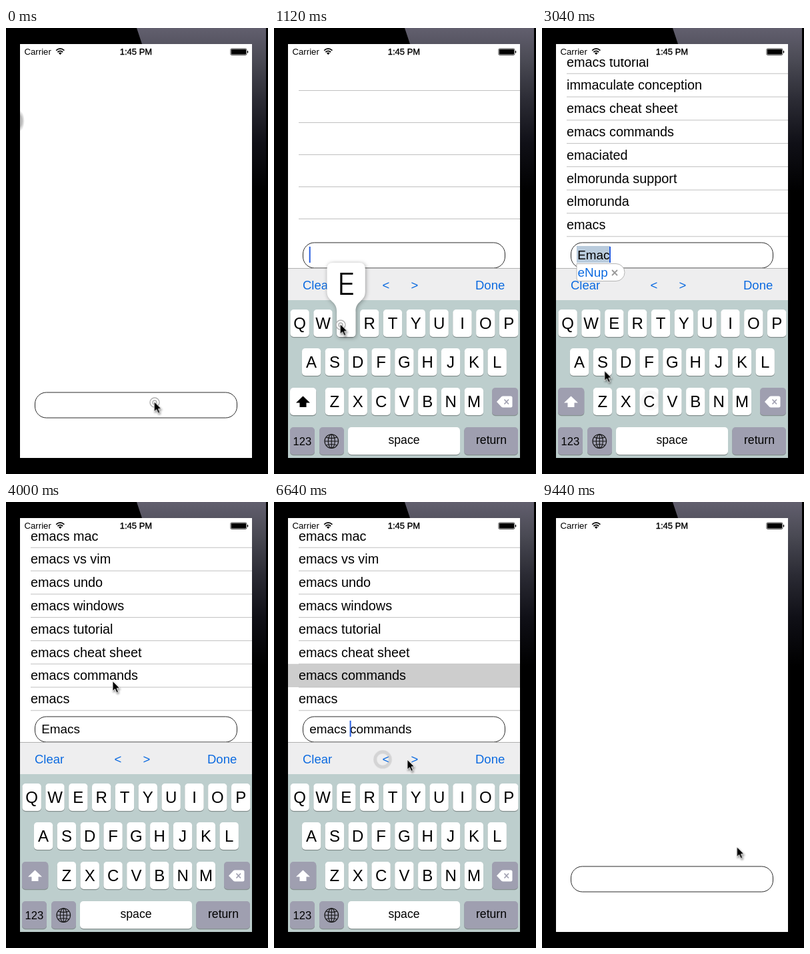
An HTML page for the animation above (9720 ms loop, 393x667 px).

```html
<!DOCTYPE html>
<html lang="en">
<head>
<meta charset="utf-8">
<title>Search field with suggestions</title>
<style>
html, body { margin: 0; width: 100%; height: 100%; overflow: hidden; background: #000; }
svg { display: block; width: 100%; height: 100%; font-family: "Liberation Sans", Arial, sans-serif; }
.row { font-size: 19.85px; }
.field { font-size: 18.9px; }
.bar { font-size: 18.5px; fill: #0b6ae0; }
.key { font-size: 24px; text-anchor: middle; }
.word { font-size: 17.6px; text-anchor: middle; }
.big { font: 300 45px Inter, "Liberation Sans", sans-serif; text-anchor: middle; }
.pop { filter: drop-shadow(1px 1px 3px rgba(0, 0, 0, .35)); }
.arrow { filter: drop-shadow(1px 2px 1.5px rgba(0, 0, 0, .45)); }
.burst { transform-box: fill-box; transform-origin: center; }
</style>
</head>
<body>
<svg id="stage" viewBox="0 0 393 667"></svg>
<script>
const LOOP = 9720;
const FIELD_DROP = 224, BOARD_DROP = 284;

// The whole session: where the pointer goes, and when it presses and lets go.
const steps = [
  { on: 'focus', x: 223, y: 560, down: 0, up: 160 },
  { on: 'E', x: 100, y: 444, down: 960, up: 1200 },
  { on: 'M', x: 288, y: 557, down: 1760, up: 1920 },
  { on: 'A', x: 53, y: 501, down: 2240, up: 2400 },
  { on: 'C', x: 163, y: 557, down: 2640, up: 2800 },
  { on: 'S', x: 93, y: 513, down: 3120, up: 3280 },
  { on: 'pick', x: 164, y: 257, down: 4400, up: 4480 },
  { on: 'rest', x: 196, y: 394, down: 5040, up: 5200 },
  { on: 'back', x: 163, y: 385, down: 5440, up: 6480 },
  { on: 'next', x: 213, y: 387, down: 6960, up: 7440 },
  { on: 'clear', x: 66, y: 386, down: 8240, up: 8400 },
  { on: 'done', x: 323, y: 386, down: 8880, up: 9040 },
  { on: 'rest', x: 293, y: 517, down: 9440, up: LOOP }];
const find = name => steps.find(s => s.on === name);
const letters = steps.filter(s => s.on.length === 1);
const taps = steps.filter(s => s.on !== 'rest');
const pickAt = find('pick').up, clearAt = find('clear').up, doneAt = find('done').up;

let css = '';

// Turns [ms, declarations] pairs into CSS keyframes for the element with that id.
function animate(id, frames, ease = 'linear') {
  const body = frames.map(([ms, rule]) => `${(ms / LOOP * 100).toFixed(3)}%{${rule}}`).join('');
  css += `@keyframes ${id}{${body}}#${id}{animation:${id} ${LOOP}ms ${ease} infinite}`;
}

// Hard switch of opacity from time a to time b.
function show(id, a, b, on = 1, off = 0) {
  animate(id, [[0, `opacity:${off}`], [a, `opacity:${on}`], [b, `opacity:${off}`]], 'step-end');
}

function slide(id, drop) {
  const curve = 'animation-timing-function:cubic-bezier(.3,.65,.2,1)';
  const low = `transform:translateY(${drop}px)`, high = 'transform:translateY(0)';
  animate(id, [[0, low], [130, `${low};${curve}`], [600, high],
    [doneAt, `${high};${curve}`], [doneAt + 400, low], [LOOP, low]]);
}

const text = (x, y, cls, s, extra = '') => `<text x="${x}" y="${y}" class="${cls}" ${extra}>${s}</text>`;
const rect = (x, y, w, h, fill, rx = 0) =>
  `<rect x="${x}" y="${y}" width="${w}" height="${h}" rx="${rx}" fill="${fill}"/>`;
const group = (id, inner, cls = '') => `<g id="${id}" class="${cls}">${inner}</g>`;

// Keyboard
const GREY = '#9f9fb0';
const PITCH = 34.83, KEY_W = 28.3, KEY_H = 41;
const spots = {};
const cap = (x, y, w, fill = '#fff') =>
  rect(x, y + 1.2, w, KEY_H, '#85908f', 5) + rect(x, y, w, KEY_H, fill, 5);

function keyRow(row, y) {
  const x0 = 195.4 - (row.length * PITCH - PITCH + KEY_W) / 2;
  return [...row].map((c, i) => {
    const x = x0 + i * PITCH;
    spots[c] = [x, y];
    return cap(x, y, KEY_W) + text(x + KEY_W / 2, y + 29.3, 'key', c);
  }).join('');
}

const shiftArrow = fill =>
  `<path d="M43.5 550.5L54 560.5H48.5V567H38.5V560.5H33Z" fill="${fill}"/>`;
const globe = `<g fill="none" stroke="#111" stroke-width="1.1"><circle cx="86.3" cy="618" r="10.3"/>
  <ellipse cx="86.3" cy="618" rx="5" ry="10.3"/>
  <path d="M86.3 607.7V628.3M76 618H96.6M78.2 612Q86.3 615 94.4 612M78.2 624Q86.3 621 94.4 624"/></g>`;
const eraser = `<path d="M334 559L341 551.5Q342 550.5 343.5 550.5H355Q357.5 550.5 357.5 553V565Q357.5 567.5 355 567.5H343.5Q342 567.5 341 566.5Z" fill="#fff"/>
  <path d="M345.5 555.5L352 562.5M352 555.5L345.5 562.5" stroke="${GREY}" stroke-width="1.7"/>`;

function popup({ on, down, up }) {
  const [x, y] = spots[on], l = x - 14.7, r = x + 42.6, e = x + KEY_W;
  const d = `M${l + 9} ${y - 70}H${r - 9}Q${r} ${y - 70} ${r} ${y - 61}V${y - 27}
    C${r} ${y - 11} ${e} ${y - 14} ${e} ${y + 3}V${y + 36}q0 5-5 5H${x + 5}q-5 0-5-5V${y + 3}
    C${x} ${y - 14} ${l} ${y - 11} ${l} ${y - 27}V${y - 61}Q${l} ${y - 70} ${l + 9} ${y - 70}Z`;
  show('pop' + on, down, up);
  return group('pop' + on, `<path d="${d}" fill="#fff"/>` + text(x + KEY_W / 2, y - 22, 'big', on), 'pop');
}

function button(id, x, label) {
  const { down, up } = find(id);
  show(id, down, up, .25, 1);
  return group(id, text(x, 390.5, 'bar', label));
}

function keyboard() {
  show('shift', 0, letters[0].up);
  return group('board', [
    rect(21, 359.5, 348, 48, '#eeeeef'), rect(21, 359, 348, 1, '#b0b0b0'),
    rect(21, 407, 348, 238, '#bdcecd'),
    keyRow('QWERTYUIOP', 421), keyRow('ASDFGHJKL', 479), keyRow('ZXCVBNM', 538),
    cap(24, 538, 39.3, GREY), shiftArrow('#fff'),
    group('shift', cap(24, 538, 39.3) + shiftArrow('#000')),
    cap(327, 538, 39, GREY), eraser,
    cap(24, 597, 37, GREY), text(42.3, 624, 'word', '123', 'style="font-size:16.6px"'),
    cap(68, 597, 37, GREY), globe,
    cap(111, 597, 168), text(195, 622, 'word', 'space'),
    cap(285.3, 597, 80.7, GREY), text(326, 622, 'word', 'return'),
    button('clear', 43, 'Clear'), button('back', 162.5, '&lt;'),
    button('next', 205.5, '&gt;'), button('done', 302, 'Done'),
    ...letters.map(popup)].join(''));
}

// Suggestions after each letter, from the bottom row upwards
const ROW = 34.8, LIST_END = 311.3, LAG = 160;
const lists = [
  'email,english,earth,easter,elephant,engine,energy,eclipse',
  'email,emacs,emoji,emerald,employment,embassy,empire,emotion',
  'email,emacs,emaciated,email login,emancipation,email address,emanate,emacs commands',
  'emacs,elmorunda,elmorunda support,emaciated,emacs commands,emacs cheat sheet,immaculate conception,emacs tutorial',
  'emacs,emacs commands,emacs cheat sheet,emacs tutorial,emacs windows,emacs undo,emacs vs vim,emacs mac'];
const line = y => rect(37, y, 332, 1, '#c0c0c0');

function table() {
  const blank = [0, 1, 2, 3, 4].map(i => line(93 + 48 * i)).join('');
  animate('blank', [[0, 'opacity:0'], [200, 'opacity:1'], [letters[0].up + LAG, 'opacity:0'],
    [clearAt, 'opacity:1'], [doneAt, 'opacity:0']], 'step-end');
  show('picked', pickAt, clearAt);
  const results = lists.map((words, n) => {
    const next = letters[n + 1];
    show('list' + n, letters[n].up + LAG, next ? next.up + LAG : clearAt);
    return group('list' + n, words.split(',').map((w, i) => {
      const y = LIST_END - i * ROW;
      return line(y) + text(37, y - 10.1, 'row', w);
    }).join(''));
  });
  return `<g clip-path="url(#view)">${group('blank', blank)}
    ${group('picked', rect(21, LIST_END - 2 * ROW + .5, 348, ROW, '#cdcdcd'))}${results.join('')}</g>`;
}

// Text field
const TYPED = 'Emacs', CHOSEN = 'emacs commands', LEFT = 53.2;
const pen = document.createElement('canvas').getContext('2d');
pen.font = '18.9px "Liberation Sans", Arial, sans-serif';
const caretAt = s => LEFT - .5 + pen.measureText(s).width;

// Every edit moves the caret and restarts its blinking.
function caret() {
  const edits = [
    [find('focus').up, ''],
    ...letters.map((s, i) => [s.up, TYPED.slice(0, i + 1)]),
    [pickAt, CHOSEN], [find('back').up, 'emacs '], [find('next').up, CHOSEN], [clearAt, '']];
  animate('caretX', [[0, 'opacity:1'], ...edits.map(([ms, s]) =>
    [ms, `transform:translateX(${caretAt(s).toFixed(1)}px)`])], 'step-end');

  const blink = [[0, 1], [480, 1], [600, 0], [800, 0]], period = 860;
  const frames = [[0, 0], [159, 0]];
  edits.forEach(([start], i) => {
    const end = i + 1 < edits.length ? edits[i + 1][0] : doneAt;
    for (let t = start; t < end; t += period)
      for (const [dt, o] of blink) if (t + dt < end) frames.push([t + dt, o]);
  });
  frames.push([doneAt, 0], [LOOP, 0]);
  animate('caret', frames.map(([ms, o]) => [ms, `opacity:${o}`]));
  return group('caretX', group('caret', rect(0, 327, 2, 24, '#2a5fe0')));
}

const markFrom = 2920, markTo = letters[4].up;
function field() {
  const typed = letters.map((s, i) => {
    const next = letters[i + 1];
    show('typed' + i, s.up, next ? next.up : pickAt);
    return group('typed' + i, text(LEFT, 346, 'field', TYPED.slice(0, i + 1)));
  });
  show('mark', markFrom, markTo);
  show('chosen', pickAt, clearAt);
  return group('field', `<rect x="43.5" y="321" width="303" height="38" rx="17" fill="#fff" stroke="#2a2a2a"/>
    ${group('mark', rect(52, 326, 50, 25, '#b9cbdc'))}${typed.join('')}
    ${group('chosen', text(LEFT, 346, 'field', CHOSEN))}${caret()}`);
}

function bubble() {
  show('bubble', markFrom, markTo);
  return group('bubble', `<path d="M52 352.5H111A13 13 0 0 1 111 378.5H56Q52 378.5 52 374Z" fill="#fff" stroke="#b4b4b4"/>
    ${text(53.5, 372, 'field', 'eNup', 'fill="#0b6ae0"')}
    <path d="M105 362L113 370M113 362L105 370" stroke="#999" stroke-width="1.8"/>`);
}

// A small ring while pressed, then a wider one that fades.
function ripples() {
  return taps.map(({ x, y, down, up }, i) => {
    show('ring' + i, down, up);
    animate('burst' + i, [[0, 'opacity:0'], [up - 1, 'opacity:0;transform:scale(.5)'],
      [up, 'opacity:.8;transform:scale(.55)'], [up + 160, 'opacity:.5;transform:scale(1)'],
      [up + 270, 'opacity:0;transform:scale(1.1)'], [LOOP, 'opacity:0']]);
    return `<g fill="none"><g id="ring${i}" stroke="#b0b0b0" stroke-width="1.4">
        <circle cx="${x}" cy="${y}" r="7" fill="#fff" fill-opacity=".55"/><circle cx="${x}" cy="${y}" r="3"/></g>
      <circle id="burst${i}" class="burst" cx="${x}" cy="${y}" r="11.3" stroke="#bbb" stroke-width="5"/></g>`;
  }).join('');
}

function pointer() {
  const frames = steps.flatMap(({ x, y, down, up }) => {
    const at = `transform:translate(${x - .7}px,${y - 1.3}px)`;
    return [[down, at], [up, at]];
  });
  animate('pointer', frames, 'cubic-bezier(.2,.6,.3,1)');
  return group('pointer', `<path class="arrow" d="M0 0V15L3.5 11.8L6 17.4L8.6 16.2L6.2 10.8H10.8Z"
    stroke="#fff" stroke-width=".9"/>`);
}

function statusBar() {
  return text(27.5, 40, '', 'Carrier', 'font-size="13.2"')
    + text(195, 40, '', '1:45 PM', 'font-size="13" text-anchor="middle" stroke="#000" stroke-width=".35"')
    + `<g fill="none" stroke="#000" stroke-width="1.7"><path d="M75.2 33.6Q81.3 28.2 87.4 33.6M77.4 36Q81.3 32.6 85.2 36"/></g>
      <path d="M81.3 40L78.9 37.5Q81.3 35.6 83.7 37.5Z"/>
      <rect x="336.9" y="30.9" width="24" height="9.6" rx="1.6" fill="none" stroke="#000" stroke-width=".7"/>`
    + rect(337.8, 31.8, 22.2, 7.8, '#000', .8) + rect(361.8, 34, 1.4, 3.4, '#000', .7);
}

slide('field', FIELD_DROP);
slide('board', BOARD_DROP);
animate('smudge', [[0, 'opacity:1'], [160, 'opacity:1'], [300, 'opacity:0'], [LOOP, 'opacity:0']]);

document.getElementById('stage').innerHTML = `<defs>
  <linearGradient id="glare" x1="0" y1="0" x2="0" y2="1">
    <stop offset="0" stop-color="#625f6e"/><stop offset=".2" stop-color="#4a4a54"/>
    <stop offset=".45" stop-color="#2a2a33"/><stop offset=".7" stop-color="#101017"/>
    <stop offset="1" stop-color="#000"/></linearGradient>
  <radialGradient id="soft"><stop offset=".5" stop-color="#bbb"/><stop offset="1" stop-color="#bbb" stop-opacity="0"/></radialGradient>
  <clipPath id="screen"><rect x="21" y="24" width="348" height="619"/></clipPath>
  <clipPath id="view"><rect x="21" y="46" width="348" height="267"/></clipPath></defs>
  ${rect(0, 0, 393, 667, '#000')}
  <path d="M196 0H390V245H369V24H204Z" fill="url(#glare)"/>
  <g clip-path="url(#screen)">
    ${rect(21, 24, 348, 619, '#fff')}
    <ellipse id="smudge" cx="20" cy="139" rx="8" ry="16" fill="url(#soft)"/>
    ${table()}${statusBar()}${field()}${keyboard()}${bubble()}${ripples()}${pointer()}
  </g>`;
document.head.appendChild(document.createElement('style')).textContent = css;
</script>
</body>
</html>
```
